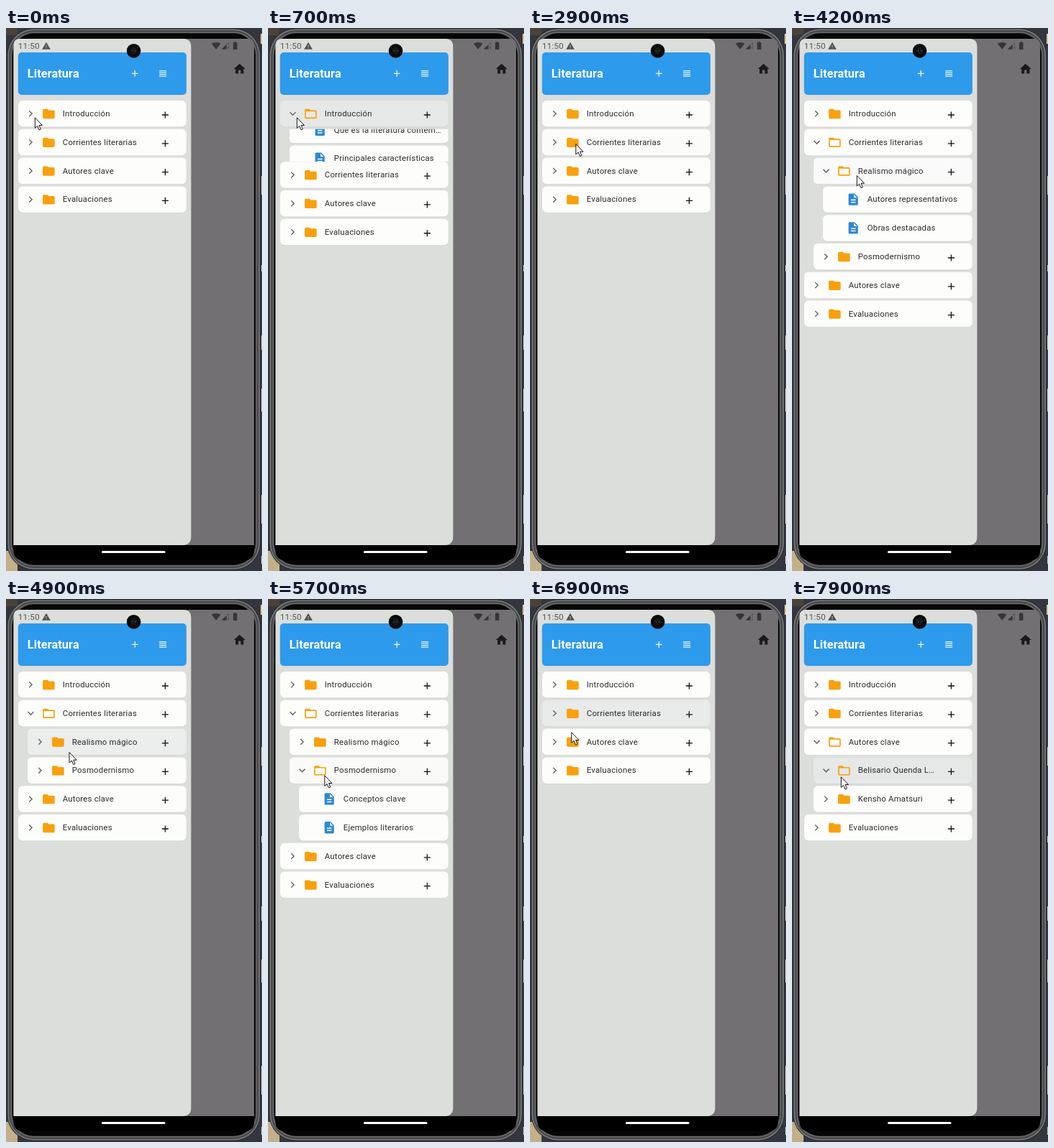
An HTML page for the animation above (8 s loop, 356 px wide and 756 px high).

```html
<!DOCTYPE html>
<html lang="es">
<head>
<meta charset="utf-8">
<title>Literatura</title>
<style>
  html, body { margin: 0; width: 100%; height: 100%; overflow: hidden; background: #24252b; }
  svg { display: block; }
  #stage { width: 100vw; height: 100vh; }
  text { font-family: Roboto, "Noto Sans", sans-serif; white-space: pre; }
  .label { font-size: 11.4px; letter-spacing: .2px; fill: #2a2a2a; }
</style>
</head>
<body>
<svg id="stage" viewBox="0 0 356 756" preserveAspectRatio="none"></svg>
<script>
const LOOP = 8000, PITCH = 39.8, ROW_H = 36.6, RIGHT = 250.7, INDENT = 13;
const TAP = 100, SLIDE = 200;

const ICON = {
  folder: 'M10 4H4c-1.1 0-2 .9-2 2v12c0 1.1.9 2 2 2h16c1.1 0 2-.9 2-2V8c0-1.1-.9-2-2-2h-8l-2-2z',
  folderOpen: 'M20 6h-8l-2-2H4c-1.1 0-2 .9-2 2v12c0 1.1.9 2 2 2h16c1.1 0 2-.9 2-2V8c0-1.1-.9-2-2-2zm0 12H4V8h16v10z',
  doc: 'M14 2H6c-1.1 0-2 .9-2 2v16c0 1.1.9 2 2 2h12c1.1 0 2-.9 2-2V8l-6-6zm2 16H8v-2h8v2zm0-4H8v-2h8v2zm-3-5V3.5L18.5 9H13z',
  right: 'M10 6L8.6 7.4 13.2 12l-4.6 4.6L10 18l6-6z',
  down: 'M16.6 8.6L12 13.2 7.4 8.6 6 10l6 6 6-6z',
  plus: 'M19 13h-6v6h-2v-6H5v-2h6V5h2v6h6v2z',
  lines: 'M4 15h16v-2H4v2zm0 4h16v-2H4v2zm0-8h16V9H4v2zm0-6v2h16V5H4z',
  home: 'M10 20v-6h4v6h5v-8h3L12 3 2 12h3v8z',
  warning: 'M1 21h22L12 2 1 21zm12-3h-2v-2h2v2zm0-4h-2v-4h2v4z',
  wifi: 'M12 21L.2 6.4C.7 6 5 3 12 3s11.4 3 11.8 3.4z',
  signal: 'M2 22h20V2z',
  signalPart: 'M2 22h12V10z',
  battery: 'M15.7 4H14V2h-4v2H8.3C7.6 4 7 4.6 7 5.3v15.4c0 .7.6 1.3 1.3 1.3h7.4c.7 0 1.3-.6 1.3-1.3V5.3C17 4.6 16.4 4 15.7 4z'
};

// press: times a row is touched; folders toggle on each touch
const folder = (name, press, kids = []) => ({ name, press, kids, isFolder: true });
const doc = (name, press = []) => ({ name, press, kids: [] });

const tree = [
  folder('Introducción', [450, 2300], [
    doc('Que es la literatura contem…', [1450]),
    doc('Principales características')
  ]),
  folder('Corrientes literarias', [2890, 6600], [
    folder('Realismo mágico', [3650, 4550], [
      doc('Autores representativos'), doc('Obras destacadas')
    ]),
    folder('Posmodernismo', [5140, 5880], [
      doc('Conceptos clave'), doc('Ejemplos literarios')
    ])
  ]),
  folder('Autores clave', [6910], [
    folder('Belisario Quenda L…', [7750]),
    folder('Kensho Amatsuri', [])
  ]),
  folder('Evaluaciones', [])
];

// start, end, x, y
const moves = [
  [0, 1, 40.3, 124.8],
  [900, 1300, 106.8, 159.8],
  [1900, 2250, 60, 121],
  [2560, 2850, 63.8, 161.5],
  [3230, 3500, 90.3, 205.5],
  [4830, 5080, 78.8, 245.8],
  [6150, 6400, 57, 155],
  [6710, 6880, 57.8, 185.8],
  [7420, 7700, 68.3, 247.8]
];

const clamp = v => Math.max(0, Math.min(1, v));
const smooth = v => v * v * (3 - 2 * v);

function add(parent, tag, attrs = {}, content) {
  const el = document.createElementNS('http://www.w3.org/2000/svg', tag);
  for (const k in attrs) el.setAttribute(k, attrs[k]);
  if (content) el.textContent = content;
  parent.appendChild(el);
  return el;
}
const rect = (p, x, y, width, height, fill, rx = 0, more = {}) =>
  add(p, 'rect', { x, y, width, height, fill, rx, ...more });
const icon = (p, name, cx, cy, s, fill) =>
  add(p, 'path', { d: ICON[name], fill, transform: `translate(${cx - 12 * s} ${cy - 12 * s}) scale(${s})` });
const show = (el, on) => el.setAttribute('visibility', on ? 'inherit' : 'hidden');

const stage = document.getElementById('stage');

function drawPhone() {
  rect(stage, 0, 0, 356, 756, '#34363f');
  rect(stage, 0, 728, 16, 28, '#c3b08a');
  rect(stage, 0, 0, 16, 10, '#4a4239');
  rect(stage, 354, 8, 2, 14, '#d8c48c');
  for (const [y, h] of [[206, 26], [330, 9], [428, 20], [502, 32], [650, 40], [735, 11]])
    rect(stage, 355, y, 1, h, '#c9c8c8');

  // nested rims of the metal case: inset, colour
  const rims = [[0, '#28292b'], [1, '#7b7c7e'], [2.6, '#47484a'], [5, '#6a6b6d'], [6.6, '#1d1d1e'], [7.6, '#060606']];
  for (const [i, fill] of rims)
    rect(stage, 1.5 + i, .5 + i, 352.5 - 2 * i, 754 - 2 * i, fill, 37 - i);

  rect(stage, 10.5, 15, 334.5, 726, '#000', 12);
  add(stage, 'path', { d: 'M10.5 720V24q0-9 9-9H336q9 0 9 9V720z', fill: '#737074' });
  add(stage, 'path', { d: 'M10.5 720V24q0-9 9-9H246.4q11 0 11 11V708q0 12-12 12z', fill: '#dcdedc' });
  rect(stage, 133, 728, 88.5, 3, '#fff', 1.5);
}

function drawBars() {
  add(stage, 'text', { x: 16.8, y: 29, 'font-size': 11.8, 'letter-spacing': .1, fill: '#555654' }, '11:50');
  icon(stage, 'warning', 56, 25, .53, '#50514f');
  icon(stage, 'wifi', 292.2, 24.8, .54, '#373538');
  icon(stage, 'signal', 305, 24.6, .5, '#555256');
  icon(stage, 'signalPart', 305, 24.6, .5, '#373538');
  rect(stage, 307.8, 22.5, 1.2, 4.2, '#8a878b');
  rect(stage, 307.8, 27.7, 1.2, 1.3, '#8a878b');
  icon(stage, 'battery', 318.7, 24.5, .56, '#373538');
  icon(stage, 'home', 324.8, 57, .8, '#1b191c');

  rect(stage, 16.8, 34.8, RIGHT - 16.6, 58.6, '#000', 5, { opacity: .1 });
  rect(stage, 16.8, 34.1, RIGHT - 16.6, 58.8, '#2e9aeb', 5);
  add(stage, 'text', {
    x: 29.8, y: 68.8, 'font-size': 16.3, 'letter-spacing': .1, 'font-weight': 700, fill: '#fff'
  }, 'Literatura');
  icon(stage, 'plus', 179.2, 63.4, .62, '#f2f8fd');
  icon(stage, 'lines', 218.1, 63.4, .63, '#e6f2fc');

  add(stage, 'circle', { cx: 177.6, cy: 31.7, r: 9.8, fill: '#080909' });
  add(stage, 'circle', { cx: 177.6, cy: 31.7, r: 5, fill: '#151718' });
  for (const x of [175.5, 179.7]) add(stage, 'circle', { cx: x, cy: 31.7, r: .9, fill: '#3c4143' });
}

function build(parent, nodes, depth) {
  const dx = depth * INDENT, x = 17 + dx, w = RIGHT - x;
  for (const n of nodes) {
    n.g = add(parent, 'g');
    rect(n.g, x, .8, w, ROW_H, '#000', 6, { opacity: .06 });
    n.back = rect(n.g, x, 0, w, ROW_H, '#fdfefc', 6);
    if (n.isFolder) {
      n.closed = add(n.g, 'g');
      icon(n.closed, 'right', 34.2 + dx, 18.3, .74, '#6a6a6a');
      icon(n.closed, 'folder', 59.4 + dx, 18.5, .83, '#f9a00c');
      n.opened = add(n.g, 'g');
      icon(n.opened, 'down', 34.5 + dx, 18.3, .76, '#6a6a6a');
      icon(n.opened, 'folderOpen', 59.4 + dx, 18.5, .83, '#f9a00c');
      icon(n.g, 'plus', 221.4, 20, .65, '#111');
    } else {
      icon(n.g, 'doc', 59.2 + dx, 18.2, .82, '#2b87d9');
    }
    add(n.g, 'text', { class: 'label', x: 78.8 + dx, y: 22 }, n.name);
    if (n.kids.length) {
      n.clip = add(n.g, 'svg', { x: 0, y: PITCH, width: 356, height: 0, overflow: 'hidden' });
      n.inner = add(n.clip, 'g');
      build(n.inner, n.kids, depth + 1);
    }
  }
}

function glow(press, t) {
  let v = 0;
  for (const p of press) {
    const d = t - p;
    if (d > 0) v = Math.max(v, Math.min(clamp(d / 150), clamp((610 - d) / 360)));
  }
  return v;
}

function openness(press, t) {
  const taps = press.filter(p => t >= p + TAP);
  if (!taps.length) return { open: false, size: 0 };
  const open = taps.length % 2 === 1;
  const k = clamp((t - taps[taps.length - 1] - TAP) / SLIDE);
  const v = open ? k : 1 - k;
  return { open, size: v * v };
}

// Places rows one under another and returns their total height
function place(nodes, t) {
  let y = 0;
  for (const n of nodes) {
    n.g.setAttribute('transform', `translate(0 ${y})`);
    const c = 1 - glow(n.press, t);
    const tone = (a, b) => Math.round(a + (b - a) * c);
    n.back.setAttribute('fill', `rgb(${tone(230, 253)},${tone(231, 254)},${tone(231, 252)})`);
    y += PITCH;
    if (!n.isFolder) continue;
    const { open, size } = openness(n.press, t);
    show(n.opened, open);
    show(n.closed, !open);
    if (n.clip) {
      const full = place(n.kids, t), h = full * size;
      n.clip.setAttribute('height', h);
      n.inner.setAttribute('transform', `translate(0 ${(h - full) / 2})`);
      y += h;
    }
  }
  return y;
}

function pointerAt(t) {
  let [, , x, y] = moves[0];
  for (const [a, b, tx, ty] of moves) {
    const k = smooth(clamp((t - a) / (b - a)));
    x += (tx - x) * k;
    y += (ty - y) * k;
  }
  return [x, y];
}

drawPhone();
drawBars();
const list = add(stage, 'g', { transform: 'translate(0 101)' });
build(list, tree, 0);
const pointer = add(stage, 'path', {
  d: 'M0 0V14.6l3.3-3.1 2.4 5.6 2.4-1-2.4-5.4H10.2z',
  fill: '#fff', stroke: '#151515', 'stroke-width': 1, 'stroke-linejoin': 'round'
});

function render(t) {
  place(tree, t);
  pointer.setAttribute('transform', `translate(${pointerAt(t).join(' ')})`);
}

const start = performance.now();
function tick() {
  render((performance.now() - start) % LOOP);
  requestAnimationFrame(tick);
}
tick();
</script>
</body>
</html>
```
